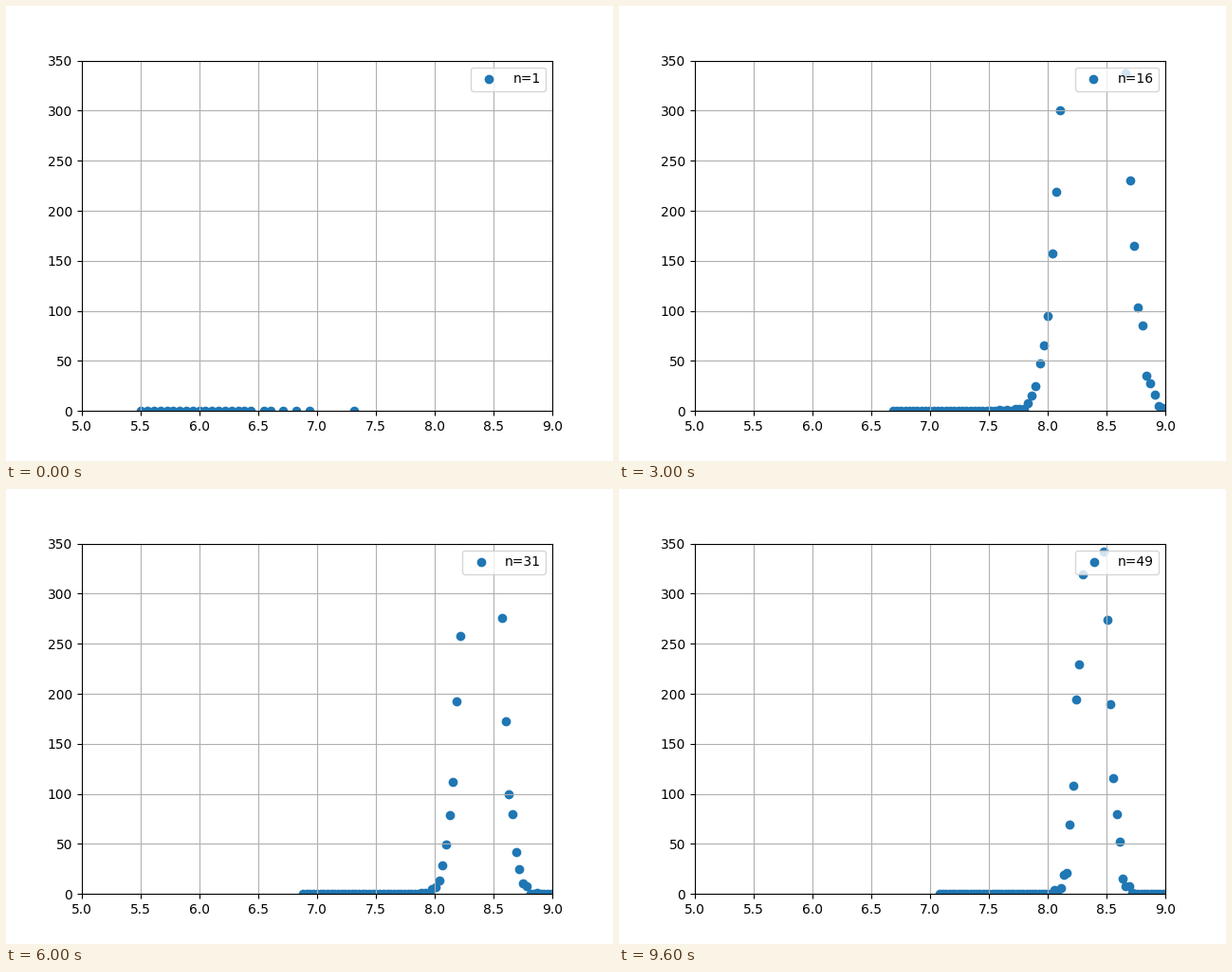
A matplotlib script that plays this animation: 640x480 px, repeating every 9.8 s.

```python
import numpy as np
import matplotlib.pyplot as plt
from matplotlib.animation import FuncAnimation

FRAMES, INTERVAL = 49, 200
BINS = 100
TOTAL, MEAN = 240000, 8.39   # pooled values and their mean
OFF = 9999                   # far above the visible range

# Left end and width of the bins at a few group sizes n
KEY_N = [1, 10, 22, 31, 36, 44, 49]
KEY_START = [5.502, 6.510, 6.799, 6.880, 6.985, 7.009, 7.080]
KEY_WIDTH = [0.0550, 0.0387, 0.0321, 0.0297, 0.0285, 0.0276, 0.0264]


def bin_positions(n):
    start, width = (np.interp(np.log(n), np.log(KEY_N), key)
                    for key in (KEY_START, KEY_WIDTH))
    return start + width * np.arange(BINS), width


def raw_counts():
    """Ungrouped values are discrete: bins are either empty or very full."""
    counts = np.full(BINS, OFF)
    counts[np.r_[:18, 19, 20:27:2, 33]] = 0
    return counts


def mean_counts(n, x, width):
    """Means of n values: a normal curve that narrows as n grows."""
    rng = np.random.default_rng(n)
    sigma = 0.74 * n ** -0.517
    peak = TOTAL / n * width / (sigma * np.sqrt(2 * np.pi))
    rate = peak * np.exp(-((x - MEAN) / sigma) ** 2 / 2)
    rough = np.exp(rng.normal(0, 0.8 / n ** 2, BINS))
    return rng.poisson(rate * rough)


fig, ax = plt.subplots(figsize=(6.4, 4.8), dpi=100)


def draw(i):
    n = i + 1
    x, width = bin_positions(n)
    counts = raw_counts() if n == 1 else mean_counts(n, x, width)
    ax.clear()
    ax.scatter(x, counts, label=f"n={n}")
    ax.set_xlim(5, 9)
    ax.set_ylim(0, 350)
    ax.grid(True)
    # The legend hops to the left every ninth step
    hop = i > 0 and i % 9 == 0
    ax.legend(loc="upper left" if hop else "upper right")


anim = FuncAnimation(fig, draw, frames=FRAMES, interval=INTERVAL,
                     repeat=True, repeat_delay=0)
plt.show()
```
